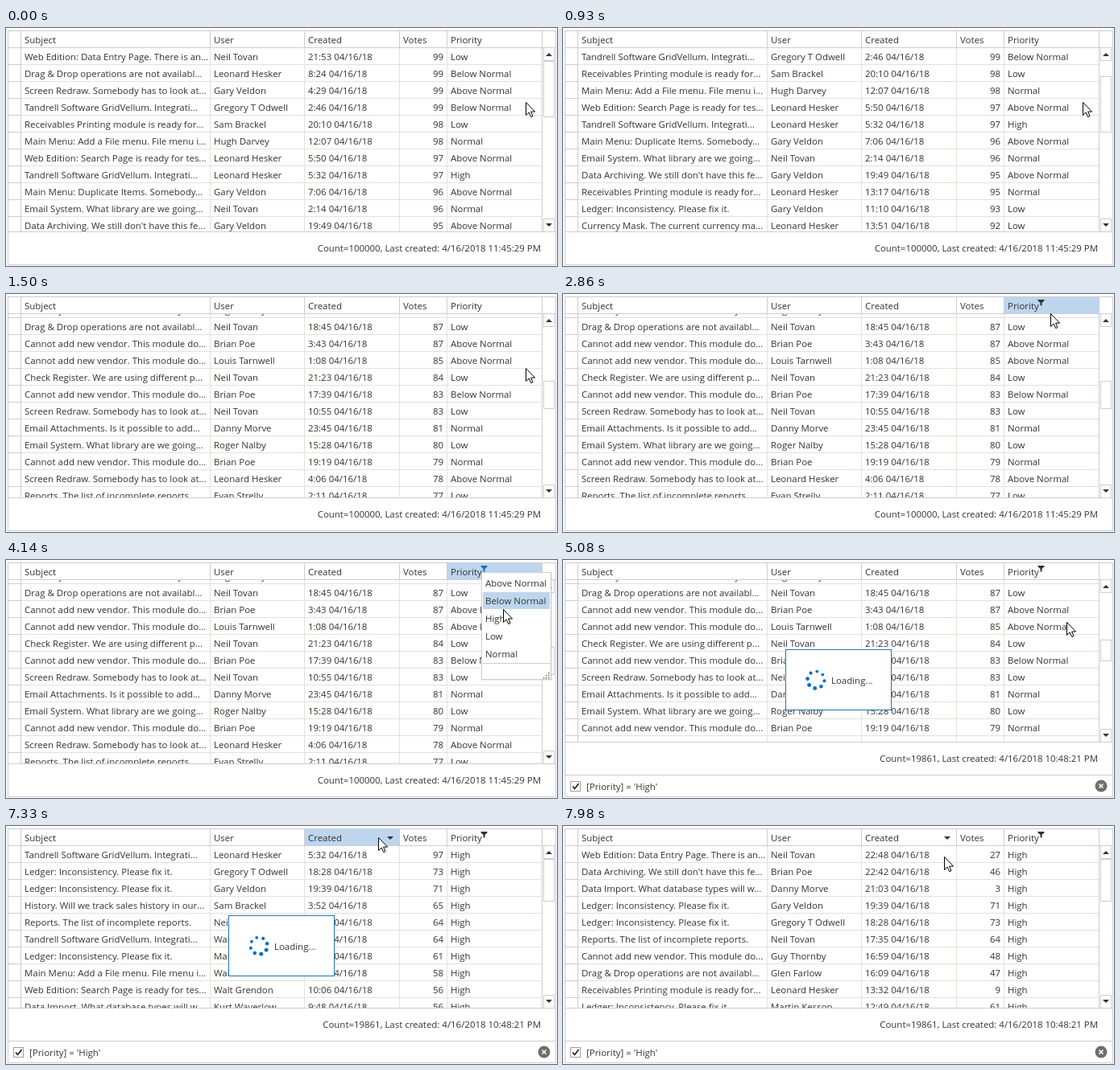
These frames come from a looping animation (684x296 px, 8000 ms). An HTML page:

```html
<!DOCTYPE html>
<html lang="en">
<head>
<meta charset="utf-8">
<title>Data grid: scroll, filter, sort</title>
<style>
html, body { margin: 0; width: 100%; height: 100%; overflow: hidden; background: #fff; }
svg { display: block; font: 11.45px "Open Sans", "Noto Sans", sans-serif; fill: #333; }
</style>
</head>
<body>
<svg id="stage" width="684" height="296" viewBox="0 0 684 296"></svg>
<script>
const LOOP = 8000, ROW = 21, TOP = 25;
const LINE = '#d0cbd2', ROW_LINE = '#e5e1d8', HOVER = '#bdd6ee', BLUE = '#0072c6';

const subjects = {
  W: 'Web Edition: Data Entry Page. There is an...',
  D: 'Drag &amp; Drop operations are not availabl...',
  S: 'Screen Redraw. Somebody has to look at...',
  X: 'Tandrell Software GridVellum. Integrati...',
  R: 'Receivables Printing module is ready for...',
  M: 'Main Menu: Add a File menu. File menu i...',
  P: 'Web Edition: Search Page is ready for tes...',
  U: 'Main Menu: Duplicate Items. Somebody...',
  E: 'Email System. What library are we going...',
  A: "Data Archiving. We still don't have this fe...",
  L: 'Ledger: Inconsistency. Please fix it.',
  C: 'Currency Mask. The current currency ma...',
  V: 'Cannot add new vendor. This module do...',
  K: 'Check Register. We are using different p...',
  T: 'Email Attachments. Is it possible to add...',
  O: 'Reports. The list of incomplete reports.',
  H: 'History. Will we track sales history in our...',
  I: 'Data Import. What database types will w...'
};
const users = {
  neil: 'Neil Tovan', leo: 'Leonard Hesker', gary: 'Gary Veldon', greg: 'Gregory T Odwell',
  sam: 'Sam Brackel', hugh: 'Hugh Darvey', brian: 'Brian Poe', louis: 'Louis Tarnwell',
  danny: 'Danny Morve', roger: 'Roger Nalby', evan: 'Evan Strelly', walt: 'Walt Grendon',
  martin: 'Martin Kessop', kurt: 'Kurt Waverlow', guy: 'Guy Thornby', glen: 'Glen Farlow'
};
const priorities = { A: 'Above Normal', B: 'Below Normal', H: 'High', L: 'Low', N: 'Normal' };

const parse = text => text.trim().split(/\s*,\s*/).map(line => {
  const [s, u, time, votes, p = 'H'] = line.split(' ');
  return [subjects[s], users[u], time + ' 04/16/18', votes, priorities[p]];
});
const allRows = parse(`
  W neil 21:53 99 L, D leo 8:24 99 B, S gary 4:29 99 A, X greg 2:46 99 B,
  R sam 20:10 98 L, M hugh 12:07 98 N, P leo 5:50 97 A, X leo 5:32 97 H,
  U gary 7:06 96 A, E neil 2:14 96 N, A gary 19:49 95 A, R leo 13:17 95 N,
  L gary 11:10 93 L, C leo 13:51 92 L, H sam 16:22 92 N, I brian 9:35 91 A,
  K hugh 14:08 90 L, T neil 3:27 90 B, W danny 22:16 89 N, O gary 6:41 88 A,
  C roger 17:30 88 N, D neil 18:45 87 L, V brian 3:43 87 A, V louis 1:08 85 A,
  K neil 21:23 84 L, V brian 17:39 83 B, S neil 10:55 83 L, T danny 23:45 81 N,
  E roger 15:28 80 L, V brian 19:19 79 N, S leo 4:06 78 A, O evan 2:11 77 L`);
const highRows = parse(`
  X leo 5:32 97, L greg 18:28 73, L gary 19:39 71, H sam 3:52 65, O neil 17:35 64,
  X walt 1:36 64, L martin 12:49 61, M walt 4:16 58, P walt 10:06 56, I kurt 9:48 56`);
const sortedRows = parse(`
  W neil 22:48 27, A brian 22:42 46, I danny 21:03 3, L gary 19:39 71, L greg 18:28 73,
  O neil 17:35 64, V guy 16:59 48, D glen 16:09 47, R leo 13:32 9, L martin 12:49 61`);

// Cursor path: time, x, y
const path = [
  [0, 645, 92], [2260, 645, 92], [3050, 598, 12], [3150, 598, 12], [3210, 596, 12],
  [3930, 596, 12], [4140, 617, 61], [4230, 625, 77], [5900, 625, 77], [6020, 624, 84],
  [6470, 455, 18], [6660, 462, 14], [7800, 462, 14], [7980, 473, 38], [LOOP, 473, 38]
];

const text = (x, y, s, extra = '') => `<text x="${x}" y="${y}" ${extra}>${s}</text>`;
const rect = (x, y, w, h, fill, stroke = 'none') =>
  `<rect x="${x}" y="${y}" width="${w}" height="${h}" fill="${fill}" stroke="${stroke}"/>`;
const shape = (d, fill, extra = '') => `<path d="${d}" fill="${fill}" ${extra}/>`;
const hLine = (y, x1 = 2, x2 = 683, color = LINE) => rect(x1, y, x2 - x1, 1, color);
const vLine = (x, y1, y2, color = LINE) => rect(x, y1, 1, y2 - y1, color);

function cursorAt(t) {
  const i = path.findIndex(k => k[0] > t);
  const [a, b] = [path[i - 1], path[i]];
  const p = (t - a[0]) / (b[0] - a[0]), e = p * p * (3 - 2 * p);
  return [1, 2].map(k => Math.round(a[k] + (b[k] - a[k]) * e));
}

function scrollAt(t) {
  if (t < 930 || t >= 5240) return 0;
  if (t < 1320) return 63 * Math.min(4, 1 + Math.floor((t - 930) / 30));
  return Math.min(436, 63 * (5 + Math.floor((t - 1320) / 30)));
}

function spinner(cx, cy, scale, t) {
  let out = '';
  for (let i = 0; i < 8; i++) {
    const a = (i / 8 + t / 4000) * 2 * Math.PI;
    const wave = 0.5 + 0.5 * Math.cos((i / 8 - t / 1000) * 2 * Math.PI);
    out += `<circle cx="${(cx + 10.5 * scale * Math.cos(a)).toFixed(2)}" cy="${
      (cy + 10.5 * scale * Math.sin(a)).toFixed(2)}" r="${((1.9 + 0.6 * wave) * scale).toFixed(2)}" fill="${BLUE}"/>`;
  }
  return out;
}

function drawRows(t, scroll, bottom) {
  const rows = t < 5240 ? allRows : t < 7480 ? highRows : sortedRows;
  const loadingMore = t < 1500;
  let out = '';
  rows.forEach(([subject, user, created, votes, priority], i) => {
    const y = TOP + i * ROW - scroll;
    if (y + ROW <= TOP || y >= bottom || (loadingMore && i >= 30)) return;
    const base = y + 15;
    out += hLine(y + ROW - 1, 3, 666, ROW_LINE) + hLine(y + ROW - 1, 3, 18) +
      text(23, base, subject, 'clip-path="url(#subject)"') + text(258, base, user) +
      text(375, base, created) + text(543, base, votes, 'text-anchor="end"') + text(552, base, priority);
  });
  const tail = TOP + 30 * ROW - scroll;
  if (loadingMore && tail < bottom)
    out += spinner(313, tail + 17, 0.6, t) + text(327, tail + 21, 'Loading...');
  return `<defs><clipPath id="body">${rect(3, TOP, 663, bottom - TOP, '#000')}</clipPath>
    <clipPath id="subject">${rect(19, TOP, 233, bottom - TOP, '#000')}</clipPath></defs>
    <g clip-path="url(#body)">${out}</g>`;
}

function drawHeader(t, hover) {
  const filtered = t >= 4460;
  let out = '';
  if (hover === 'priority') out += rect(548, 4, 117, 20, HOVER);
  if (hover === 'created') out += rect(371, 4, 117, 20, HOVER);
  [[23, 'Subject'], [258, 'User'], [375, 'Created'], [493, 'Votes'], [552, 'Priority']]
    .forEach(([x, s]) => out += text(x, 19, s));
  if (filtered || hover === 'priority')
    out += shape('M589.5 7h8v1.2l-3 2.8v4l-2-1v-3l-3-2.8z', filtered || t < 3150 ? '#333' : BLUE);
  if (t >= 6890) out += shape('M473 13h8l-4 4z', '#333');
  return out;
}

function drawColumns(bottom) {
  const inner = [253, 370, 488, 547];
  return [18, 665].map(x => vLine(x, 4, bottom)).join('') +
    inner.map(x => vLine(x, 4, TOP) + vLine(x, TOP, bottom, ROW_LINE)).join('');
}

function drawScrollbar(t, scroll, bottom) {
  const view = bottom - TOP, track = view - 34;
  const loaded = t >= 1500 && t < 5240 ? 1260 : 630;
  const content = Math.max(loaded, scroll + view);
  const thumb = Math.round(track * view / loaded);
  const y = Math.round(42 + (track - thumb) * scroll / (content - view));
  return rect(667.5, 24.5, 13, 16, '#fff', LINE) + shape('M670 35h8l-4-4z', '#333') +
    rect(667.5, bottom - 15.5, 13, 16, '#fff', LINE) +
    shape(`M670 ${bottom - 10}h8l-4 4z`, '#333') +
    rect(667.5, y - 0.5, 13, thumb - 1, '#fff', LINE);
}

function drawFilterPanel() {
  return hLine(267) + rect(9.5, 275.5, 12, 12, '#fff', '#a0a0a0') +
    shape('M12 281.5l2.5 3 5-6.5', 'none', 'stroke="#222" stroke-width="1.7"') +
    text(29, 286, "[Priority] = 'High'") +
    '<circle cx="668" cy="281" r="7.5" fill="#6e6e6e"/>' +
    shape('M665.5 278.5l5 5m0-5l-5 5', 'none', 'stroke="#fff" stroke-width="1.5"');
}

function drawPopup(y) {
  const active = Math.floor((y - 18) / 22);
  let out = rect(591, 17, 87, 133, 'rgba(0,0,0,.08)') + rect(590.5, 15.5, 86, 133, '#fff', LINE);
  Object.values(priorities).forEach((name, i) => {
    if (i === active) out += rect(592, 40 + 22 * (i - 1), 83, 21, HOVER);
    out += text(595, 33 + 22 * i, name);
  });
  out += hLine(128, 591, 677);
  for (let r = 0; r < 3; r++)
    for (let c = 2 - r; c < 3; c++) out += rect(667 + 3 * c, 140 + 3 * r, 1.5, 1.5, '#666');
  return out;
}

function render(t) {
  const [x, y] = cursorAt(t), scroll = scrollAt(t);
  const filtered = t >= 4460, popup = t >= 3570 && t < 4460;
  const bottom = filtered ? 226 : 253;
  const inHeader = y < TOP;
  const hover = popup || (inHeader && t < 4460) ? 'priority' : inHeader && t >= 6500 ? 'created' : '';
  const summary = t < 4900 ? 'Count=100000, Last created: 4/16/2018 11:45:29 PM'
    : 'Count=19861, Last created: 4/16/2018 10:48:21 PM';
  const busy = (t >= 4760 && t < 5300) || (t >= 7180 && t < 7540);

  let out = rect(0, 0, 684, 296, '#fff') + drawRows(t, scroll, bottom) + drawHeader(t, hover) +
    drawScrollbar(t, scroll, bottom) + drawColumns(bottom) + hLine(24) + hLine(bottom) +
    rect(2.5, 3.5, 680, 291, 'none', LINE) + text(664, bottom + 25, summary, 'text-anchor="end"');
  if (filtered) out += drawFilterPanel();
  if (popup) out += drawPopup(y);
  if (busy) out += rect(276.5, 111.5, 131, 75, '#fff', '#1f76ae') + spinner(314, 149, 1, t) +
    text(333, 154, 'Loading...');
  out += shape('M.5.5V16.5L4.2 13 6.7 18.6 9 17.6 6.6 12.1H11.6Z', '#fff',
    `stroke="#000" transform="translate(${x} ${y})"`);
  return out;
}

const stage = document.getElementById('stage');
const start = performance.now();
let last = '';
function tick() {
  const t = Math.max(0, performance.now() - start) % LOOP;
  const picture = render(Math.floor(t / 10) * 10);
  if (picture !== last) stage.innerHTML = last = picture;
  requestAnimationFrame(tick);
}
tick();
</script>
</body>
</html>
```
